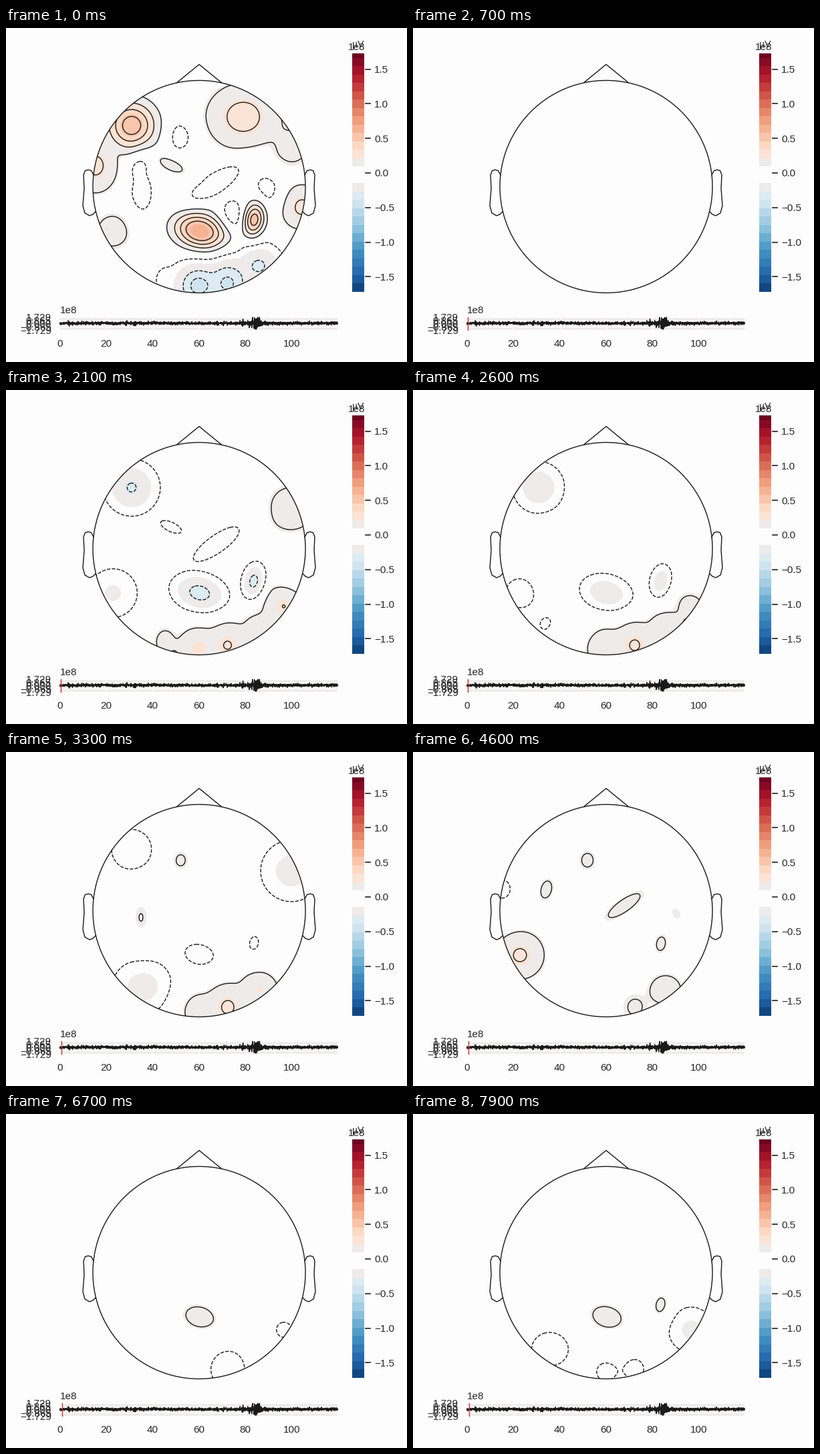
A matplotlib script that plays this animation: 600x500 px, repeating every 8000 ms.

```python
import numpy as np
import matplotlib.pyplot as plt
from matplotlib.animation import FuncAnimation
from matplotlib.patches import Circle, Rectangle

plt.rcParams["font.family"] = "Liberation Sans"
PX = 0.72                       # points per pixel at 100 dpi
BACK, INK, TEXT, GREY = "#fdfdfd", "#1a1a1a", "#262626", "#efebeb"
FRAMES = 80

fig = plt.figure(figsize=(6, 5), dpi=100, facecolor=BACK)
ax = fig.add_axes([0, 0, 1, 1])
ax.set_xlim(0, 600)
ax.set_ylim(500, 0)
ax.axis("off")

# electrode sites: centre, spread along two axes, turn in degrees
SITES = {
    "F7": (188, 146, 36, 36, 0), "F1": (261, 162, 21, 25, 0), "F4": (355, 133, 58, 52, 0),
    "F8": (427, 178, 46, 46, 0), "T7": (134, 206, 36, 44, 0), "FC3": (199, 206, 17, 28, 15),
    "FC1": (247, 205, 34, 14, 25), "FC4": (349, 207, 29, 15, 0), "C3": (202, 248, 20, 40, 0),
    "Cz": (316, 230, 58, 18, -35), "C4": (394, 242, 22, 32, -25), "T8": (442, 268, 36, 36, 0),
    "TP7": (160, 264, 50, 26, -20), "P7": (160, 304, 40, 40, 0), "P3": (206, 288, 18, 34, 0),
    "Pz": (290, 304, 38, 26, 15), "CP2": (339, 281, 20, 24, 0), "P4": (371, 287, 16, 25, 10),
    "P8": (416, 323, 36, 36, 0), "PO7": (205, 352, 46, 42, 0), "PO3": (238, 377, 26, 34, 0),
    "O1": (288, 386, 36, 36, 0), "O2": (332, 382, 36, 40, 0), "PO4": (378, 356, 34, 32, 0),
}
# signed peak at each active site, by pose
POSES = {
    0: dict(F7=.56, F4=.28, F8=.14, T7=.26, FC1=.15, Pz=.66, P4=.56, T8=.26, P7=.15, F1=-.13,
            FC3=-.13, C3=-.13, Cz=-.15, C4=-.13, CP2=-.17, PO3=-.09, O1=-.42, O2=-.40, PO4=-.3),
    13: dict(F7=-.31, T7=-.10, Pz=-.40, P4=-.38, T8=-.085, F4=-.073, F1=.14, C4=.125, CP2=.16,
             TP7=.15, PO3=.13, O1=.34, O2=.36, PO4=.28, P8=.15),
    21: dict(F7=-.29, FC1=-.09, Cz=-.12, Pz=-.33, P4=-.34, P7=-.16, T8=-.072, F8=.18,
             PO3=.14, O1=.23, O2=.24, PO4=.16, P8=.24),
    33: dict(F7=-.14, F8=-.19, Pz=-.1, P4=-.085, PO7=-.19, F1=.125, C3=.113,
             O1=.17, O2=.25, PO4=.22),
    46: dict(F1=.13, FC3=.14, Cz=.14, P7=.25, P4=.13, O2=.12, PO4=.17, C4=.102, T7=-.078),
    57: dict(T7=.16, P7=.14, Pz=.15, F4=.102, FC3=-.1, FC4=-.1, P3=-.08, CP2=-.09,
             C4=-.075, O2=-.14),
    79: dict(Pz=.155, P4=.145, PO7=-.1, O1=-.08, O2=-.08, P8=-.17),
}

xs, ys = np.arange(126, 453, 2.0), np.arange(74, 402, 2.0)
X, Y = np.meshgrid(xs, ys)


def bump(cx, cy, sx, sy, turn):
    c, s = np.cos(np.radians(turn)), np.sin(np.radians(turn))
    u, v = (X - cx) * c + (Y - cy) * s, (Y - cy) * c - (X - cx) * s
    return np.exp(-(u / sx)**2 - (v / sy)**2)


bumps = np.array([bump(*site) for site in SITES.values()])
peaks = np.array([[pose.get(name, 0) for name in SITES] for pose in POSES.values()])


def join(heights):
    """Soft union of the bumps with the given non-negative heights."""
    return np.cbrt(np.tensordot(heights**3, bumps**3, 1))


def scalp(n):
    p = np.array([np.interp(n, list(POSES), column) for column in peaks.T])
    return join(np.maximum(p, 0)) - join(np.maximum(-p, 0))


def band_colour(i):
    """Colour of the i-th band above (or below) zero."""
    if i == 0:
        return BACK
    return GREY if abs(i) == 1 else plt.cm.RdBu_r(0.5 + 0.035 * i)


BANDS = [*(-0.145 - 0.12 * np.arange(4))[::-1], *(0.097 + 0.12 * np.arange(7))]
BAND_COLOURS = [band_colour(i) for i in range(-3, 7)]
LEVELS = [-0.38, -0.28, -0.07, 0.11, 0.235, 0.36, 0.485]


def line(x, y, colour=INK, width=1.4, **kw):
    return ax.plot(x, y, color=colour, lw=width * PX, **kw)[0]


def label(x, y, s, size=11, ha="center"):
    ax.text(x, y, s, fontsize=size, color=TEXT, ha=ha, va="baseline")


# head
head = ax.add_patch(Circle((289, 237.5), 159, fc="none", ec=INK, lw=1.4 * PX, zorder=5))
line([256, 289, 322], [81.5, 54.5, 81.5], zorder=5)
ear_x = np.array([131, 127.5, 123, 118.5, 116, 117, 115, 118, 125, 130, 134])
ear_y = [220, 213.5, 212.3, 213.5, 220, 240, 266, 277, 281, 279, 275]
for x in (ear_x, 578 - ear_x):
    line(x, ear_y, zorder=5)


# colour bar
def bar(top, bottom, colour):
    ax.add_patch(Rectangle((518, top), 18, bottom - top, fc=colour, ec="none", antialiased=False))


for i in range(14):
    bar(max(194.5 - 12.5 * i, 38), 207 - 12.5 * i, band_colour(i + 1))
for i in range(13):
    bar(232 + 12.5 * i, 244.5 + 12.5 * i, band_colour(-i - 1))
for i in range(-3, 4):
    y = 217 - 51.8 * i
    line([538, 545], [y, y], TEXT, 1.7)
    label(551, y + 5.5, f"{i / 2:.1f}".replace("-", "−"), ha="left")
label(512, 33, "1e8", ha="left")
label(526.5, 29.5, "µV", 10)

# signal strip
ax.add_patch(Rectangle((81, 433), 415, 19, fc=GREY, ec="none"))
for i in range(6):
    x = 81 + 69.25 * i
    if i:
        line([x, x], [433, 452], "white")
    label(x, 477, str(20 * i))
for i in range(5):
    y = 433 + 4.75 * i
    line([81, 496], [y, y], "white")
    label(68, y + 5.5, f"{1.729 * (1 - i / 2):.3f}".replace("-", "−"), ha="right")
label(81, 427, "1e8", ha="left")

rng = np.random.default_rng(4)
sx = np.linspace(81, 496, 4000)
gain = 0.6 + 1.6 * np.exp(-((sx - 375) / 5)**2) + 0.9 * np.exp(-((sx - 372) / 16)**2)
for x in (94, 194, 316, 354):
    gain += 1.6 * np.exp(-((sx - x) / 0.8)**2)
line(sx, 442 + np.clip(gain * rng.laplace(size=sx.size), -9, 9))
cursor = line([81, 81], [433, 452], "#d03030", zorder=6)

shown = []


def draw(n):
    while shown:
        shown.pop().remove()
    z = scalp(n)
    shown.append(ax.contourf(xs, ys, z, BANDS, colors=BAND_COLOURS, zorder=2))
    # a single colour makes negative levels dashed
    shown.append(ax.contour(xs, ys, z, LEVELS, colors=INK, linewidths=1, zorder=3))
    for cs in shown:
        cs.set_clip_path(head)
    x = int(80.85 + 0.0357 * n)
    cursor.set_xdata([x + 0.5, x + 0.5])
    cursor.set_visible(x > 80)
    return []


anim = FuncAnimation(fig, draw, frames=FRAMES, interval=100, repeat=True, repeat_delay=0)
plt.show()
```
